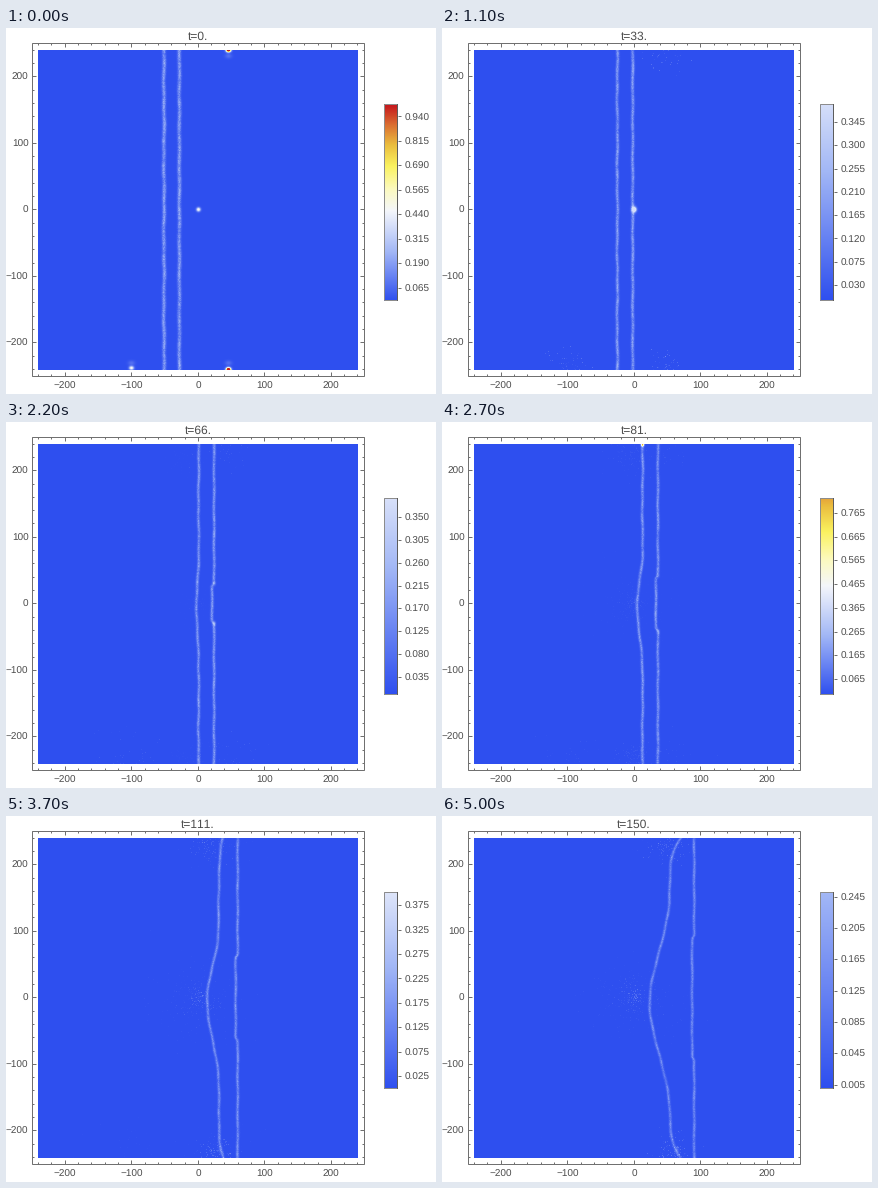
Animation of 430 by 366 pixels, one loop 5.1 s. Source, as a matplotlib script:

```python
import numpy as np
import matplotlib.pyplot as plt
from matplotlib.animation import FuncAnimation
from matplotlib.colors import LinearSegmentedColormap
from matplotlib.patches import Rectangle

W, H, DPI = 430, 366, 100
FRAMES, STEP_MS, DT = 51, 100, 3
CX, CY, UNIT = 192, 181.5, 0.665        # data origin and pixels per unit
LEFT, TOP, SIZE = 32, 22, 320           # density map
BAR_X, BAR_W, BAR_TOP, BAR_BOTTOM = 378, 14, 76, 273
SPEED = 0.525                           # pixels per time unit
LINE, INK = "#707070", "#4c4c4c"
PX = 72 / DPI

plt.rcParams["font.family"] = "Liberation Sans"
plt.rcParams["text.hinting"] = "none"
plt.rcParams["text.hinting_factor"] = 1

heat = LinearSegmentedColormap.from_list("heat", [
    (0, "#2e4fef"), (0.25, "#a2b7f6"), (0.46, "#f4f6fb"), (0.57, "#fcfac0"),
    (0.69, "#faf25f"), (0.8, "#eabc3e"), (0.9, "#db7032"), (1, "#c61a1e")], N=1024)

rows = TOP + 0.5 + np.arange(SIZE)
X, Y = np.meshgrid(LEFT + 0.5 + np.arange(SIZE), rows)


def peak_at(t):
    return float(np.interp(t, [0, 9, 33, 54, 72, 81, 96, 129, 150],
                           [1.006, 0.6, 0.381, 0.366, 0.4, 0.83, 0.446, 0.351, 0.2516]))


def since(t, start):
    return max(0, t - start)


def pulse(t, start, top, end):
    """Rise linearly from start to top, then fall to zero at end."""
    return max(0, min((t - start) / (top - start), (end - t) / (end - top)))


def trail_x(t):
    """The rear front: held back in the middle, running free at the edges."""
    edge = np.minimum(rows - TOP, TOP + SIZE - rows)
    lag = 0.155 * since(t, 88) * (1 - 1.25 * np.exp(-edge / 14))
    reach = np.clip(np.abs(rows - 187) / (0.7 * t + 1), 0, 1)
    dip = 0.2 * since(t, 54) * np.cos(reach * np.pi / 2) ** 2
    wave = np.sin(rows * 0.21 + t * 0.05) + np.sin(rows * 0.083 - t * 0.03)
    return 158 + SPEED * t - lag - dip + 0.25 * wave


def ring(t):
    return 0.5 * since(t, 28)


def lead_x(t):
    inside = 0.5 * (1 - np.tanh((np.abs(rows - CY) - ring(t)) / 1.5))
    wave = np.sin(rows * 0.17 + t * 0.04)
    return 173.4 + SPEED * t - min(2, ring(t) / 4) * inside + 0.25 * wave


def spot(x, y, amp, rx, ry):
    return amp * np.exp(-((X - x) / rx) ** 2 - ((Y - y) / ry) ** 2)


def front(rng, x, amp, width):
    along = np.convolve(rng.random(SIZE + 4), np.ones(5) / 5, "valid")[:, None]
    grain = 0.5 + 0.6 * along + 0.4 * (rng.random((SIZE, SIZE)) - 0.5)
    return amp * grain * np.exp(-((X - x[:, None]) / width) ** 2)


def speckle(rng, field, x, y, sx, sy, count, amp):
    px = (rng.normal(x, sx, count) - LEFT).astype(int)
    py = (rng.normal(y, sy, count) - TOP).astype(int)
    ok = (px >= 0) & (px < SIZE) & (py >= 0) & (py < SIZE)
    np.add.at(field, (py[ok], px[ok]), amp * rng.random(ok.sum()))


def density(t):
    rng = np.random.default_rng(t + 5)
    trail, lead = trail_x(t), lead_x(t)
    width = 1.4 + 0.4 * np.exp(-t / 30)
    amp = 0.22 - 0.0004 * t
    field = front(rng, trail, amp, width) + front(rng, lead, amp, width)

    # Small target at the origin, swept up by the leading front
    field += spot(CX + 0.5, CY, 0.5 * (1 - pulse(t, 27, 42, 1e9)) * (t < 42), 2, 2)
    field += spot(lead.max() + 1, CY, 0.4 * pulse(t, 27, 33, 45), 2.2, 3)
    kink = 0.5 * pulse(t, 33, 42, 1e9) * np.exp(-since(t, 42) / 22)
    r = ring(t) + 1
    field += spot(lead.max(), CY - r, 0.7 * kink, 1.5, 2.2)
    field += spot(lead.max(), CY + r, kink, 1.5, 2.2)

    # Edge sources and their scattered remains
    fade = np.exp(-t / 6)
    spread = 2 + min(t, 60) * 0.25
    dust = 0.2 * np.exp(-t / 40) * (1 - fade)
    for x, y, level, halo_y in ((222.5, 22, 1.5, 28), (222.5, 341.5, 1.5, 335),
                                (125.5, 340, 0.5, 335)):
        field += spot(x, y, level * fade, 2.3, 1.9)
        field += spot(x, halo_y, 0.08 * fade, 3.5, 2.5)
        speckle(rng, field, x, halo_y, spread, spread * 0.7, 45, dust)

    # Late scattering at the centre and where the trail meets the edges
    late = 0.09 * min(1, since(t, 60) / 60)
    for spread, count, level in ((4, 45, 1), (11, 120, 0.5), (22, 200, 0.2)):
        speckle(rng, field, CX, CY, spread, spread, count, level * late)
    speckle(rng, field, trail[0] - 13, 32, 11, 10, 120, 0.7 * late)
    speckle(rng, field, trail[-1] - 8, 334, 9, 7, 110, late)
    field += spot(trail[0], 22.8, 0.7 * pulse(t, 70, 81, 108), 1.5, 1.5)
    field += spot(trail[-1] - 3, 334, 0.17 * pulse(t, 105, 129, 160), 2, 3)
    return np.clip(field, 0, peak_at(t))


def bar_ticks(peak):
    gaps, parts = (7, 8) if peak > 0.28 else (6, 6)
    unit = 0.005
    step = np.floor(peak / parts / unit + 1e-6) * unit
    first = np.floor((peak - gaps * step) / 2 / unit + 1e-6) * unit
    return first + step * np.arange(gaps + 1)


fig = plt.figure(figsize=(W / DPI, H / DPI), dpi=DPI, facecolor="white")
ax = fig.add_axes([0, 0, 1, 1])
ax.axis("off")


def label(x, y, text, ha, size=10):
    return ax.text(x, y, text, ha=ha, va="baseline", fontsize=size * PX, color=INK)


def box(x0, y0, x1, y1, color=LINE):
    ax.add_patch(Rectangle((x0, y0), x1 - x0, y1 - y0, fill=False, ec=color,
                           lw=PX, snap=True, zorder=4))


def picture(data, x0, x1, y0, y1):
    return ax.imshow(data, cmap=heat, vmin=0, vmax=1, aspect="auto",
                     interpolation="nearest", extent=(x0, x1, y1, y0))


field_img = picture(np.zeros((SIZE, SIZE)), LEFT, LEFT + SIZE, TOP, TOP + SIZE)
ramp = np.linspace(1, 0, BAR_BOTTOM - BAR_TOP)[:, None]
bar_img = picture(ramp, BAR_X, BAR_X + BAR_W, BAR_TOP, BAR_BOTTOM)
ax.set_xlim(0, W)
ax.set_ylim(H, 0)

# Whole coordinates snap to the centre of their pixel
FX0, FX1, FY0, FY1 = 26, 358, 15, 348
BAR_R = BAR_X + BAR_W - 1
box(FX0, FY0, FX1, FY1)
box(BAR_X, BAR_TOP, BAR_R, BAR_BOTTOM - 1, "#8c8c8c")
ax.plot([BAR_R, BAR_R], [BAR_TOP, BAR_BOTTOM - 1], color="#5c5c5c", lw=PX,
        snap=True, zorder=5)


def tick(xs, ys):
    return ax.plot(xs, ys, color=LINE, lw=PX, snap=True, solid_capstyle="butt")[0]


for v in range(-240, 241, 20):
    major = v % 100 == 0
    size = 4 if major else 2
    px, py = CX + UNIT * v - 0.2, CY - UNIT * v - 0.2
    for edge, sign in ((FY0, 1), (FY1, -1)):
        tick([px, px], [edge, edge + sign * size])
    for edge, sign in ((FX0, 1), (FX1, -1)):
        tick([edge, edge + sign * size], [py, py])
    if major:
        name = str(v).replace("-", "\u2212")
        label(px + 0.2, 360.5, name, "center")
        label(22.5, py + 3.7, name, "right")

title = label(CX, 12, "", "center", 12)
bar_marks = [tick([], []) for _ in range(8)]
bar_labels = [label(399, 0, "", "left") for _ in range(8)]


def update(i):
    t = i * DT
    peak = peak_at(t)
    field_img.set_data(density(t))
    bar_img.set_data(ramp * peak)
    title.set_text(f"t={t}.")
    for artist in bar_marks + bar_labels:
        artist.set_visible(False)
    for value, mark, text in zip(bar_ticks(peak), bar_marks, bar_labels):
        y = BAR_BOTTOM - value / peak * (BAR_BOTTOM - BAR_TOP)
        mark.set_data([BAR_R + 1, BAR_R + 4], [y - 0.5, y - 0.5])
        text.set_text(f"{value:.3f}")
        text.set_y(y + 3.5)
        mark.set_visible(True)
        text.set_visible(True)
    return [field_img, bar_img, title, *bar_marks, *bar_labels]


anim = FuncAnimation(fig, update, frames=FRAMES, interval=STEP_MS,
                     repeat=True, repeat_delay=0, blit=False)
plt.show()
```
